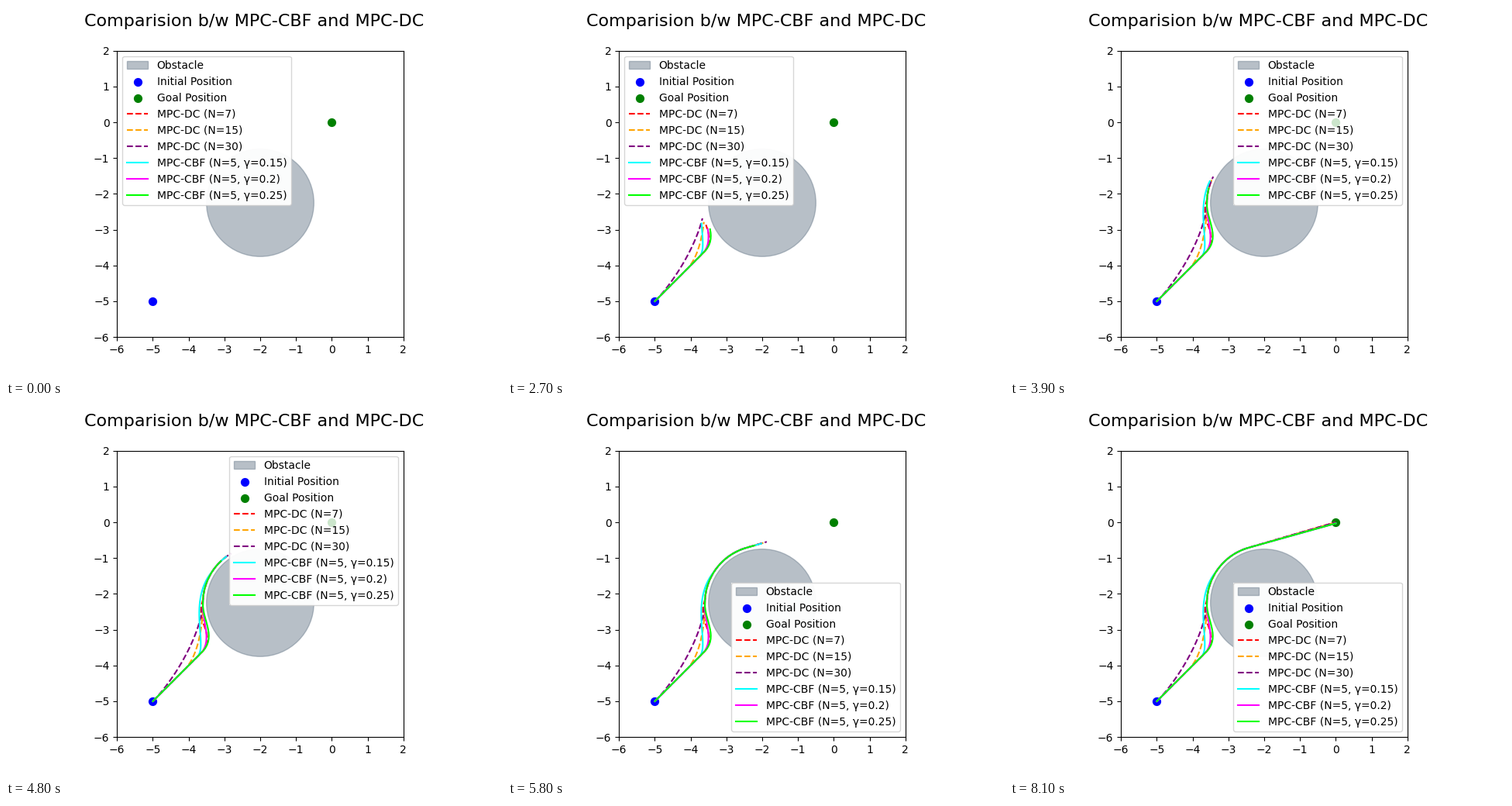
These frames come from a looping animation (640x480 px, 10 s). A matplotlib script:

```python
import numpy as np
import matplotlib.pyplot as plt
from matplotlib.animation import FuncAnimation
from matplotlib.transforms import IdentityTransform

FRAMES, INTERVAL = 100, 100
STEP = 0.1
START, GOAL = np.array([-5, -5]), np.array([0, 0])
CENTER, RADIUS, SAFE_RADIUS = np.array([-2, -2.25]), 1.5, 1.6
DC_END, CBF_END = (0, 0), (0, -0.03)


def bezier(p0, p1, p2, p3, samples=60):
    u = np.linspace(0, 1, samples)[:, None]
    v = 1 - u
    return v**3 * p0 + 3*v*v*u * p1 + 3*v*u*u * p2 + u**3 * p3


def safe_arc(join):
    """Safety circle from the join angle to the tangent through the goal."""
    away = GOAL - CENTER
    leave = (np.arctan2(away[1], away[0])
             + np.arccos(SAFE_RADIUS / np.hypot(*away)))
    a = np.linspace(np.radians(join), leave, 60)
    return CENTER + SAFE_RADIUS * np.column_stack([np.cos(a), np.sin(a)])


def trajectory(leave, handle, approach, join, end, finish):
    """Diagonal run, swerve onto the safety circle, straight to the goal."""
    arc = safe_arc(join)
    turn = np.full(2, leave)
    swerve = bezier(turn, turn + handle, np.array(approach), arc[0])
    curve = np.vstack([START, swerve, arc[1:], end])
    s = np.r_[0, np.cumsum(np.hypot(*np.diff(curve, axis=0).T))]
    # Unit speed, apart from a slight delay while swerving.
    t = np.arange(FRAMES) * STEP
    travelled = np.interp(t, [0, 2, 3.2, finish],
                          [0, 2, s[-1] - (finish - 3.2), s[-1]])
    return np.column_stack([np.interp(travelled, s, c) for c in curve.T])


RUNS = [
    ("MPC-DC (N=7)", "red", "--",
     trajectory(-3.62, 0.42, (-3.85, -2.70), 178, DC_END, 7.9)),
    ("MPC-DC (N=15)", "orange", "--",
     trajectory(-4.10, 0.35, (-3.60, -2.95), 180, DC_END, 7.85)),
    ("MPC-DC (N=30)", "purple", "--",
     trajectory(-5.00, 0.60, (-3.65, -3.15), 180, DC_END, 7.75)),
    ("MPC-CBF (N=5, γ=0.15)", "cyan", "-",
     trajectory(-3.75, 0.30, (-4.05, -2.20), 146, CBF_END, 7.9)),
    ("MPC-CBF (N=5, γ=0.2)", "magenta", "-",
     trajectory(-3.66, 0.34, (-3.64, -2.70), 180, CBF_END, 8.1)),
    ("MPC-CBF (N=5, γ=0.25)", "lime", "-",
     trajectory(-3.62, 0.42, (-3.63, -2.70), 180, CBF_END, 8.1)),
]

fig, ax = plt.subplots(figsize=(6.4, 4.8), dpi=100)
fig.suptitle("Comparision b/w MPC-CBF and MPC-DC", fontsize=16)
ax.set_aspect("equal")
ax.set(xlim=(-6, 2), ylim=(-6, 2), xticks=range(-6, 3), yticks=range(-6, 3))
ax.apply_aspect()
ax.add_patch(plt.Circle(CENTER, RADIUS, color="slategrey", alpha=0.5,
                        label="Obstacle"))
ax.scatter(*START, s=50, color="blue", zorder=1.8, label="Initial Position")
ax.scatter(*GOAL, s=50, color="green", zorder=1.8, label="Goal Position")
lines = [ax.plot([], [], style, color=color, label=label)[0]
         for label, color, style, _ in RUNS]
legend = ax.legend(loc="upper left")

# Fades the obstacle, but not the markers, behind the legend.
veil = ax.add_patch(plt.Rectangle((0, 0), 1, 1, color="white", alpha=0.8,
                                  lw=0, zorder=1.5,
                                  transform=IdentityTransform()))


def legend_place(frame):
    if frame < 31:
        return "upper left"
    return "upper right" if frame < 49 else "lower right"


def update(frame):
    for line, (*_, path) in zip(lines, RUNS):
        line.set_data(*path[:frame + 1].T)
    legend.set_loc(legend_place(frame))
    veil.set_bounds(*legend.get_window_extent().bounds)
    return [*lines, legend, veil]


anim = FuncAnimation(fig, update, frames=FRAMES, interval=INTERVAL,
                     repeat=True, repeat_delay=0)
plt.show()
```
